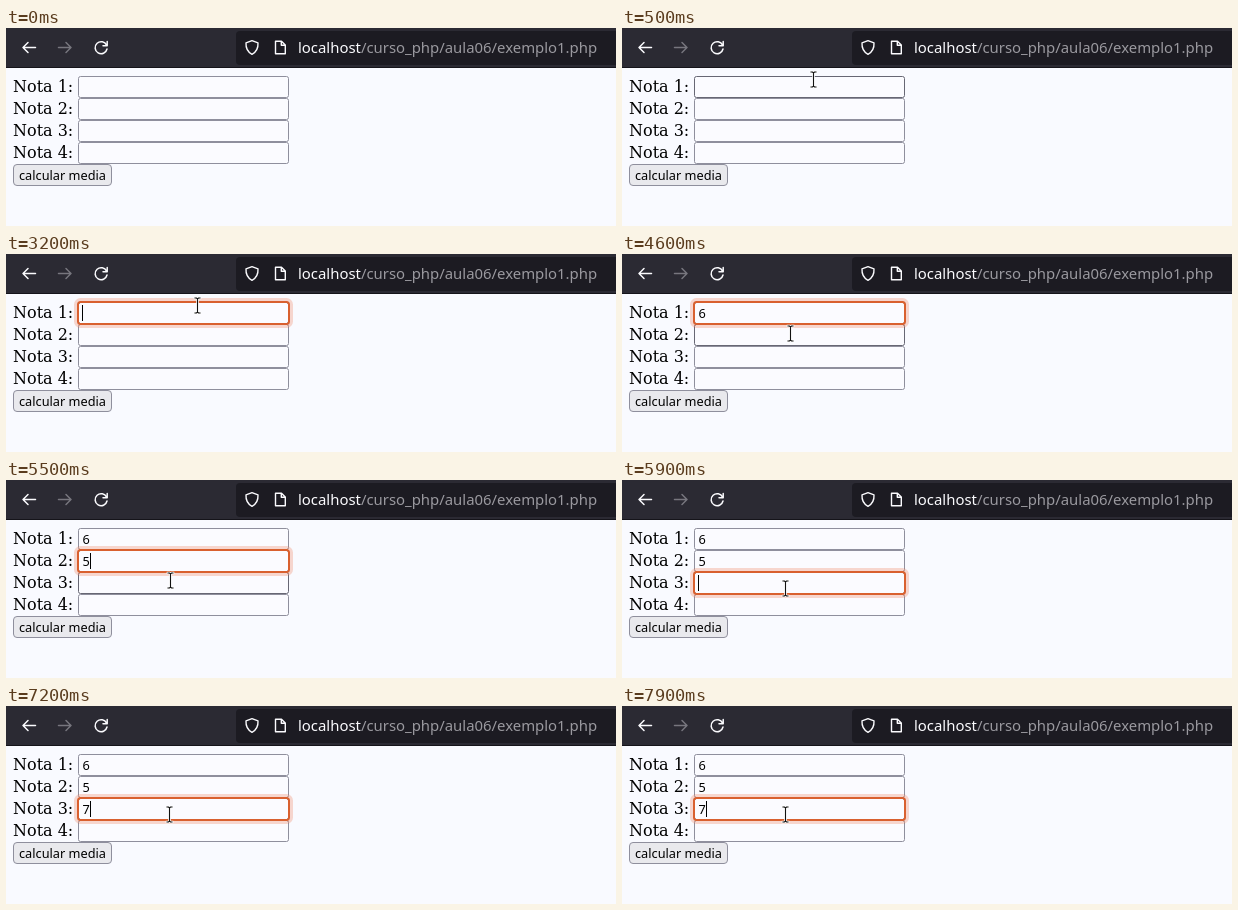
An HTML page for the animation above (8 s loop, 610 by 198 pixels).

```html
<!DOCTYPE html>
<html lang="pt">
<head>
<meta charset="utf-8">
<style>
html, body { margin: 0; width: 100%; height: 100%; overflow: hidden; background: #f9faff; }
svg { display: block; }
text { white-space: pre; }
.label { font: 16px "DejaVu Serif", serif; }
.ui { font: 12.75px "Noto Sans", sans-serif; }
.url { font: 14.9px "Noto Sans", sans-serif; fill: #9a999f; }
.icon { fill: none; stroke: #fbfbfe; stroke-width: 1.5; stroke-linecap: round; stroke-linejoin: round; }
</style>
</head>
<body>
<svg width="610" height="198" viewBox="0 0 610 198">
  <rect width="610" height="40" fill="#2b2a33"/>
  <rect y="39" width="610" height="1" fill="#15141a"/>
  <rect x="230" y="3" width="390" height="34" rx="4" fill="#1c1b22"/>
  <g class="icon">
    <path d="M29.5 19.5H17M22 14.5L17 19.5L22 24.5"/>
    <path d="M52.5 19.5H65M60 14.5L65 19.5L60 24.5" stroke="#77767e" style="stroke:#77767e"/>
    <path d="M100.6 17.2A6 6 0 1 0 101 21M101.2 13.5V17.8H97"/>
    <path d="M246 12.7L252 14.8C252.3 20 250.5 24 246 26.3C241.500 24 239.700 20 240 14.800Z" stroke-width="1.4"/>
    <path d="M269.500 13.200H275.500L279.300 17V25.800H269.500ZM275.300 13.500V17.200H279" stroke-width="1.4"/>
  </g>
  <text class="url" x="292" y="25"><tspan fill="#fbfbfe">localhost</tspan>/curso_php/aula06/exemplo1.php</text>

  <g id="form"></g>
  <rect x="7.500" y="136.500" width="98" height="21" rx="3.500" fill="#e9e9ed" stroke="#8f8f9d"/>
  <text class="ui" x="13" y="152">calcular media</text>

  <g id="ring" fill="none">
    <rect x="69.500" y="45.500" width="216" height="27" rx="5" stroke="#e95420" stroke-opacity=".22" stroke-width="3"/>
    <rect x="72" y="48" width="211" height="22" rx="2.500" stroke="#d9602f" stroke-width="2"/>
  </g>
  <rect id="caret" y="51" width="1" height="16"/>
  <g id="mouse" fill="none" stroke-linecap="square">
    <path id="beam" d="M-2.500 -7.500H-1L0 -6.500L1 -7.500H2.500M0 -6V6.500M-2.500 7.500H-1L0 6.500L1 7.500H2.500" stroke="#fff" stroke-width="3"/>
    <use href="#beam" style="stroke:#000"/>
  </g>
</svg>
<script>
const LOOP = 8000, ROW = 22;
const $ = id => document.getElementById(id);

$('form').innerHTML = [0, 1, 2, 3].map(i => `<g transform="translate(0 ${i * ROW})">
  <text class="label" x="7" y="64">Nota ${i + 1}:</text>
  <rect class="field" x="72.5" y="48.5" width="210" height="21" rx="2" fill="#fbfbff"/>
  <text class="ui value" x="76.5" y="64"></text></g>`).join('');
const fields = document.querySelectorAll('.field');
const values = document.querySelectorAll('.value');

// Beam outline and core share one path
$('beam').removeAttribute('stroke');
$('beam').removeAttribute('stroke-width');
$('mouse').innerHTML = ['#fff" stroke-width="2.6', '#111" stroke-width="1.1']
  .map(s => `<path d="${$('beam').getAttribute('d')}" stroke="${s}"/>`).join('');

// [time, x, y]: the pointer holds each place until the next
const path = [[300, 214, 121], [400, 200, 80], [500, 191, 51],
  [4400, 182, 61], [4500, 172, 73], [4600, 168, 79], [4700, 165, 80],
  [5500, 164, 100], [5600, 163, 105], [5700, 163, 108]];
const focus = [[800, 0], [4800, 1], [5900, 2]];
const typed = [[4300, '6'], [5100, '5'], [7100, '7']];
const caretOff = [[2000, 3200], [4500, 4800]];

const latest = (list, t) => list.filter(k => k[0] <= t).pop();
const show = (el, on) => el.setAttribute('visibility', on ? 'visible' : 'hidden');

function draw(t) {
  const pos = latest(path, t), active = latest(focus, t);
  const hover = pos ? Math.floor((pos[2] - 48) / ROW) : -1;
  fields.forEach((f, i) => f.setAttribute('stroke', i === hover ? '#676774' : '#8f8f9d'));
  typed.forEach(([at, digit], i) => values[i].textContent = t >= at ? digit : '');

  show($('mouse'), pos);
  if (pos) $('mouse').setAttribute('transform', `translate(${pos[1] + .5} ${pos[2] + .5})`);

  show($('ring'), active);
  show($('caret'), active && !caretOff.some(([a, b]) => t >= a && t < b));
  if (active) {
    const row = active[1], down = `translate(0 ${row * ROW})`;
    $('ring').setAttribute('transform', down);
    $('caret').setAttribute('transform', down);
    $('caret').setAttribute('x', t >= typed[row][0] ? 84 : 76);
  }
}

const start = performance.now();
function tick() {
  draw((performance.now() - start) % LOOP);
  requestAnimationFrame(tick);
}
tick();
</script>
</body>
</html>
```
